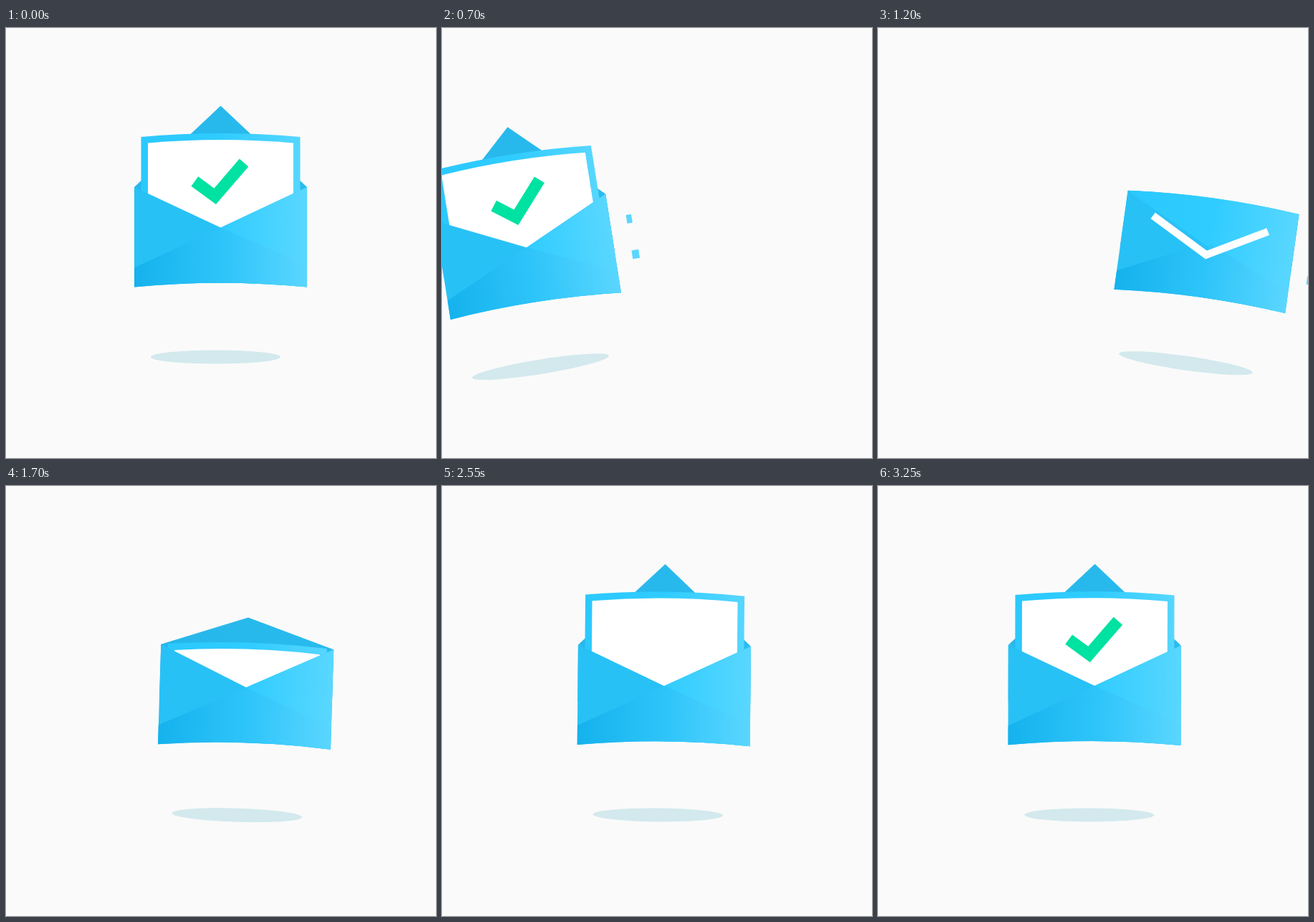
Write an HTML page with a canvas that moves like this. It is 600 px wide and 600 px high and loops after 3.3 s.

```html
<!DOCTYPE html>
<html lang="en">
<head>
<meta charset="utf-8">
<title>Envelopes</title>
<style>
html, body { margin: 0; width: 100%; height: 100%; overflow: hidden; background: #fafafa; }
canvas { display: block; width: 600px; height: 600px; }
</style>
</head>
<body>
<canvas id="stage"></canvas>
<script>
const canvas = document.getElementById('stage');
const ctx = canvas.getContext('2d');
const dpr = window.devicePixelRatio || 1;
canvas.width = canvas.height = 600 * dpr;

const LOOP = 3300, FRAME = 60, TICK = 50;
const HUB = { x: 300, y: 1430.5 }, RADIUS = 1069, SPACING = 43.8;
const RAD = Math.PI / 180;

// Envelope space: origin in the middle of the bottom edge
const W = 120.5, TOP = -139.5, DIP = -83, FLAP_DOWN = 62, FLAP_UP = -113.5;

// Wheel turn in degrees over time
const TURN = [
  [0, 0], [240, 1.21], [480, 4.42], [600, 7.2], [780, 14.45], [900, 22.7],
  [1050, 30.8], [1200, 35.7], [1440, 40.17], [1680, 42.03], [1800, 42.43],
  [2400, 43.2], [2520, 43.28], [3000, 43.47], [3240, 43.665], [3300, SPACING]
];
const SLOPES = TURN.map((p, i) => {
  const a = TURN[i - 1], b = TURN[i + 1];
  if (!a || !b) return 0.0025;
  const s = (p[1] - a[1]) / (p[0] - a[0]), e = (b[1] - p[1]) / (b[0] - p[0]);
  return 2 * s * e / (s + e);
});

function turnAt(t) {
  let i = 0;
  while (i < TURN.length - 2 && t >= TURN[i + 1][0]) i++;
  const [t0, v0] = TURN[i], [t1, v1] = TURN[i + 1];
  const d = t1 - t0, u = (t - t0) / d, r = 1 - u;
  return r * r * (1 + 2 * u) * v0 + u * u * (3 - 2 * u) * v1
    + d * u * r * (r * SLOPES[i] - u * SLOPES[i + 1]);
}

function ease(t, from, to) {
  const u = Math.min(1, Math.max(0, (t - from) / (to - from)));
  return (1 - Math.cos(Math.PI * u)) / 2;
}

function shade(x0, x1, ...colors) {
  const g = ctx.createLinearGradient(x0, 0, x1, 0);
  colors.forEach((c, i) => g.addColorStop(i / (colors.length - 1), c));
  return g;
}

const BACK = shade(-W, W, '#27b7ea', '#29bbee');
const LIGHT = shade(-W, W, '#2bc8fd', '#2fccff', '#59d7ff');
const LOWER = shade(-W, W, '#15b2ed', '#2dc4f9', '#5ad6ff');

function poly(color, ...pts) {
  ctx.beginPath();
  pts.forEach(p => ctx.lineTo(p[0], p[1]));
  ctx.closePath();
  ctx.fillStyle = color;
  ctx.fill();
}

function stroke(color, width, pts) {
  ctx.beginPath();
  pts.forEach(p => ctx.lineTo(p[0], p[1]));
  ctx.strokeStyle = color;
  ctx.lineWidth = width;
  ctx.stroke();
}

// Sheet with an arched top edge
function sheet(color, half, top, rise, bottom) {
  ctx.beginPath();
  ctx.moveTo(-half, top);
  ctx.quadraticCurveTo(0, top - 2 * rise, half, top);
  ctx.lineTo(half, bottom);
  ctx.lineTo(-half, bottom);
  ctx.closePath();
  ctx.fillStyle = color;
  ctx.fill();
}

function tick(part) {
  if (part <= 0) return;
  const a = [-36.2, -147.5], b = [-7.8, -126.7], c = [32.5, -173.5];
  const mix = (p, q, u) => [p[0] + (q[0] - p[0]) * u, p[1] + (q[1] - p[1]) * u];
  const bend = 0.36;
  const pts = part < bend ? [a, mix(a, b, part / bend)]
    : [a, b, mix(b, c, (part - bend) / (1 - bend))];
  stroke('#00e2a1', 16.5, pts);
}

function front() {
  ctx.save();
  ctx.beginPath();
  ctx.moveTo(-W, TOP);
  ctx.lineTo(0, DIP);
  ctx.lineTo(W, TOP);
  ctx.lineTo(W, 0);
  ctx.quadraticCurveTo(0, -11.5, -W, 0);
  ctx.closePath();
  ctx.fillStyle = '#28c1f6';
  ctx.fill();
  ctx.clip();
  poly(LIGHT, [0, DIP], [W + 1, TOP - 1], [W + 1, 0], [0, 0]);
  poly(LOWER, [-W - 1, -26.5], [0, DIP], [W + 1, -30], [W + 1, 2], [-W - 1, 2]);
  ctx.restore();
}

function envelope(s) {
  const { flap } = s;
  if (s.dash > 0) {
    ctx.fillStyle = '#5ad6ff';
    ctx.fillRect(144, -106, 50.5 * s.dash, 12);
    ctx.fillRect(144, -56, 67.5 * s.dash, 12);
  }
  sheet(BACK, W, TOP, 5.5, -60);
  if (flap < 0) poly(BACK, [-W, TOP], [0, TOP + flap], [W, TOP]);
  sheet(LIGHT, 111, -209.5 + s.drop, 5, -60);
  sheet('#fff', 101.5, -201 + s.drop, 4.5, -60);
  tick(s.tick);
  front();
  if (flap > 0) {
    const k = flap / FLAP_DOWN;
    ctx.beginPath();
    ctx.moveTo(-W, TOP);
    ctx.quadraticCurveTo(0, TOP - 11, W, TOP);
    ctx.lineTo(0, TOP + flap);
    ctx.closePath();
    ctx.fillStyle = LIGHT;
    ctx.fill();
    stroke('#fff', 10.5, [[-81, TOP + 30 * k], [0, TOP + 74 * k], [81, TOP + 30 * k]]);
  }
}

function place(deg, sink, state) {
  ctx.save();
  ctx.translate(HUB.x, HUB.y);
  ctx.rotate(deg * RAD);
  const grow = 1 + 0.00143 * Math.pow(sink, 1.5);
  ctx.beginPath();
  ctx.ellipse(-7.5, -971.5, 90.5 * grow, 9.5 * grow, 0, 0, 2 * Math.PI);
  ctx.fillStyle = '#d3e9ed';
  ctx.fill();
  ctx.translate(-0.5, sink - RADIUS);
  ctx.rotate(-0.0025 * deg * Math.abs(deg) * RAD);
  envelope(state);
  ctx.restore();
}

function draw(t) {
  ctx.setTransform(dpr, 0, 0, dpr, 0, 0);
  ctx.fillStyle = '#fafafa';
  ctx.fillRect(0, 0, 600, 600);
  const out = turnAt(t), into = SPACING - out;
  place(-out, 1.31 * out + 0.012 * out * out, {
    flap: FLAP_UP, drop: 0, tick: 1, dash: ease(t, 600, 840)
  });
  place(into, 1.1 * into + 0.0085 * into * into, {
    flap: FLAP_DOWN + (FLAP_UP - FLAP_DOWN) * ease(t, 1380, 1920),
    drop: 69 * (1 - ease(t, 1680, 2160)),
    tick: ease(t, 2560, 2940),
    dash: 1 - ease(t, 1200, 1460)
  });
}

// Poses are held: 60 ms frames shown on a 50 ms clock
const start = performance.now();
function loop() {
  const t = Math.max(0, performance.now() - start) % LOOP;
  const shown = Math.floor(t / TICK) * TICK;
  draw(Math.floor(shown / FRAME) * FRAME);
  requestAnimationFrame(loop);
}
loop();
</script>
</body>
</html>
```
